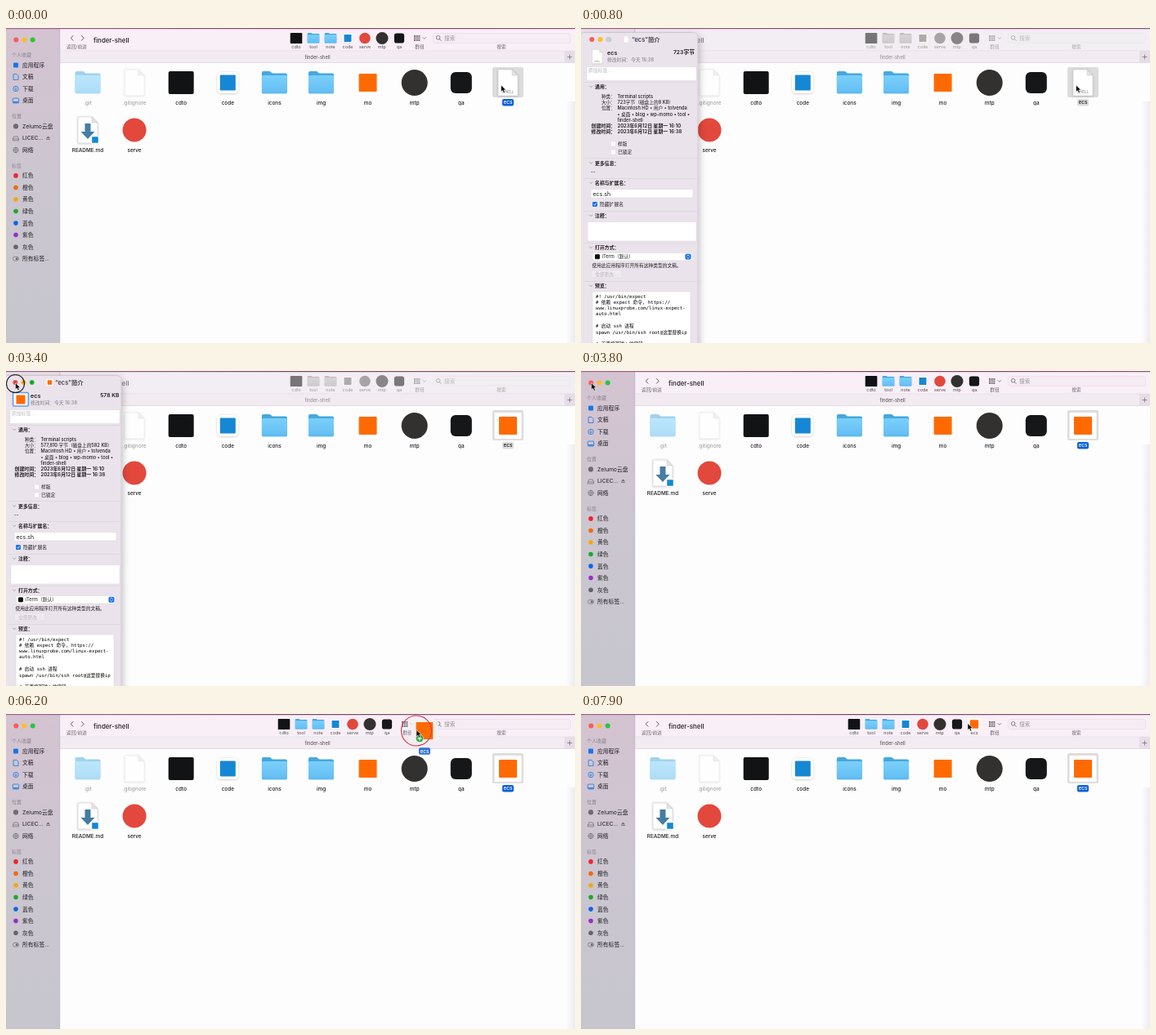
Write an HTML page that moves like this. It is 696 px wide and 386 px high and loops after 8000 ms.

```html
<!DOCTYPE html>
<html lang="zh-CN">
<head>
<meta charset="utf-8">
<title>finder-shell</title>
<style>
html, body { margin: 0; width: 100%; height: 100%; overflow: hidden; background: #fff; }
svg { display: block; }
text { font-family: Inter, "Noto Sans CJK SC", "Noto Sans CJK", sans-serif; white-space: pre; }
text.mono { font-family: "DejaVu Sans Mono", "Noto Sans CJK SC", "Noto Sans CJK", monospace; }
</style>
</head>
<body>
<svg id="stage" width="696" height="386" viewBox="0 0 696 386"></svg>
<script>
const LOOP = 8000;
const BLUE = '#0a60d8', ORANGE = '#ff6a00', INK = '#1f1d20', GREY = '#8d888e';

// --- drawing helpers (text is placed by its vertical centre) ---
const text = (x, y, s, size = 6.4, { fill = INK, anchor = 'start', weight = 400, cls = '' } = {}) =>
  `<text x="${x}" y="${y + size * .36}" font-size="${size}" fill="${fill}" text-anchor="${anchor}" font-weight="${weight}" class="${cls}">${s}</text>`;
const rect = (x, y, w, h, fill, r = 0, more = '') =>
  `<rect x="${x}" y="${y}" width="${w}" height="${h}" fill="${fill}" rx="${r}" ${more}/>`;
const circle = (x, y, r, fill, more = '') => `<circle cx="${x}" cy="${y}" r="${r}" fill="${fill}" ${more}/>`;
const line = (d, stroke = INK, w = .8) =>
  `<path d="${d}" fill="none" stroke="${stroke}" stroke-width="${w}" stroke-linecap="round" stroke-linejoin="round"/>`;
const group = (id, body, more = '') => `<g id="${id}" ${more}>${body}</g>`;
const at = (x, y, s, body, more = '') => `<g transform="translate(${x} ${y}) scale(${s})" ${more}>${body}</g>`;
const mid = { anchor: 'middle' };
const square = (size, fill, r = 0) => rect(-size / 2, -size / 2, size, size, fill, r);
const lights = (x, y) => ['#fc5b57', '#fdbc2e', '#2ac53f'].map((c, i) => circle(x + 10.2 * i, y, 3, c)).join('');

// --- icons, centred on 0,0 in a box about 34 wide ---
const page = `<path d="M-12-16H5l7 7V16h-24z" fill="#fff" stroke="#cbcbce" stroke-width=".6" filter="url(#soft)"/>
  <path d="M5-16v7h7z" fill="#e3e3e5" stroke="#c4c4c8" stroke-width=".5"/>`;
const icon = {
  folder: `<path d="M-15.500-12q0-2 2-2h8l3 2.500h16q2 0 2 2V11h-31z" fill="#45a8de"/>` +
    rect(-15.5, -9, 31, 22.5, 'url(#folder)', 1.6) + rect(-14.5, 11, 29, .7, '#55b3e8'),
  page,
  shell: page + text(0, 11, 'SHELL', 4.6, { ...mid, fill: '#77777a' }),
  terminal: rect(-15.5, -14, 31, 28, '#111315', 2),
  code: rect(-13, -13, 26, 26, '#fff', 5.5, 'filter="url(#soft)"') + square(19, '#1687d4', 1),
  cloud: rect(-16.5, -16, 33, 32, '#fff', 1, 'stroke="#efefef" stroke-width=".5"') + square(22, ORANGE, 1),
  panda: circle(0, 0, 16, '#33312f'),
  qa: square(26, '#151718', 6),
  globe: circle(0, 0, 14.5, '#e2483c'),
  readme: page + `<path d="M-3.500-8h7V2h5L0 11-8.500 2h5z" fill="#467da3"/>` +
    at(9, 12, .4, rect(-13, -13, 26, 26, '#fff', 5.5) + square(19, '#1687d4', 1)),
};

const files = [
  ['.git', 'folder'], ['.gitignore', 'page'], ['cdto', 'terminal'], ['code', 'code'], ['icons', 'folder'],
  ['img', 'folder'], ['mo', 'cloud'], ['mtp', 'panda'], ['qa', 'qa'], null, ['README.md', 'readme'], ['serve', 'globe'],
];
const fileGrid = files.map((f, i) => {
  if (!f) return '';
  const x = 100 + 57.1 * (i % 10), y = i < 10 ? 67 : 125, dim = f[0][0] === '.';
  return at(x, y, 1, icon[f[1]], dim ? 'opacity=".5"' : '') +
    text(x, y + 24.2, f[0], 6.4, { ...mid, fill: dim ? '#a5a5a7' : INK, weight: 500 });
}).join('');

const selectedFile = rect(595, 48, 38, 37, '#dcdcdd', 2.5) +
  group('fileShell', at(614, 67, 1, icon.shell)) + group('fileCloud', at(614, 67, 1, icon.cloud)) +
  rect(607, 87, 14, 8.5, BLUE, 2, 'id="labelBox"') +
  `<text id="label" x="614" y="93.4" font-size="6.4" font-weight="500" text-anchor="middle">ecs</text>`;

// --- sidebar ---
const glyph = {
  app: square(6, '#1878e8', 1),
  doc: line('M-2.500-3.500H1l2 2v5h-5.500z', '#1878e8'),
  down: circle(0, 0, 3.2, 'none', 'stroke="#1878e8" stroke-width=".8"') + line('M0-1.700V1.500M-1.400.2 0 1.600 1.400.2', '#1878e8', .7),
  desk: rect(-3.7, -3, 7.4, 6, 'none', 1, 'stroke="#1878e8" stroke-width=".8"') + rect(-3, 1, 6, 1.4, '#1878e8'),
  drive: line('M-3.500 1-2.200-2h4.400L3.500 1v2h-7zM-3.500 1h7', '#706b72', .7),
  net: circle(0, 0, 3.2, 'none', 'stroke="#706b72" stroke-width=".7"') +
    line('M-3.200 0h6.400M0-3.200v6.400M0-3.200q-3 3.200 0 6.400M0-3.200q3 3.200 0 6.400', '#706b72', .5),
  all: rect(-3.5, -2.4, 7, 4.8, 'none', 2.4, 'stroke="#706b72" stroke-width=".7"') + circle(1.2, 0, 1.5, '#706b72'),
  disc: circle(0, 0, 3.1, '#706b72'),
};
const dot = c => circle(0, 0, 2.8, c);
const sideSections = [
  [33, '个人收藏', [['应用程序', glyph.app], ['文稿', glyph.doc], ['下载', glyph.down], ['桌面', glyph.desk]]],
  [108, '位置', [['Zelumo云盘', glyph.disc], ['LICEC...', glyph.drive], ['网络', glyph.net]]],
  [168.5, '标签', [['红色', dot('#f5222d')], ['橙色', dot('#f56a0a')], ['黄色', dot('#f7a70a')], ['绿色', dot('#1fa82e')],
    ['蓝色', dot('#0a66e8')], ['紫色', dot('#9a2fc4')], ['灰色', dot('#66636a')], ['所有标签...', glyph.all]]],
];
const sidebar = rect(0, 1, 66, 385, 'url(#side)', 0, 'id="sideFill"') + lights(12.3, 14.5) +
  sideSections.map(([y, name, rows]) => text(7, y, name, 6, { fill: '#8b818c', weight: 500 }) +
    rows.map(([label, art], i) => {
      const ry = y + 12.4 + 14.55 * i;
      return at(12, ry, 1, art) + text(20, ry, label, 6.8);
    }).join('')).join('') +
  `<path d="M49 135.300l2.500-2.800 2.500 2.800z" fill="#706b72"/>` + rect(49, 136.2, 5, .8, '#706b72');

// --- toolbar ---
const tools = [['cdto', 'terminal'], ['tool', 'folder'], ['note', 'folder'], ['code', 'code'], ['serve', 'globe'], ['mtp', 'panda'], ['qa', 'qa']];
const tool = ([name, art], x) => at(x, 12.5, .47, icon[art]) + text(x, 22.7, name, 5.4, { ...mid, fill: '#4e494f' });
const gridDots = [0, 1, 2].map(r => [0, 1, 2].map(c => rect(499 + 2.7 * c, 9 + 2.5 * r, 2, 1.8, '#6b666c')).join('')).join('');
const toolbar =
  line('M82 9.400 79.300 12.300 82 15.200M92.500 9.400 95.200 12.300 92.500 15.200', '#555055', .9) +
  text(74, 23, '返回/前进', 5.7, { fill: '#6d676e' }) +
  text(107, 14.8, 'finder-shell', 7.8, { weight: 600, fill: '#3a363b' }) +
  group('tools', tools.map((t, i) => tool(t, 355 + 21 * i)).join('')) +
  group('newTool', tool(['ecs', 'cloud'], 481)) +
  group('arrange', gridDots + line('M510 11.600l1.800 1.800 1.800-1.800', '#6b666c') + text(506, 23, '群组', 5.7, { ...mid, fill: '#6d676e' })) +
  rect(522.5, 6.5, 168, 12, '#f5ecf4', 2.5, 'stroke="#e9dfe8" stroke-width=".7"') +
  circle(528.6, 11.8, 2.3, 'none', 'stroke="#6b666c" stroke-width=".8"') + line('M530.300 13.500l2 2', '#6b666c') +
  text(536, 12.5, '搜索', 6.8, { fill: '#9b949b' }) + text(606, 23, '搜索', 5.7, { ...mid, fill: '#6d676e' });

const finder = rect(0, 0, 696, 386, '#fdfdfe') + rect(685, 90, 11, 296, 'url(#edge)') +
  rect(66, 1, 630, 27, '#f8eff7', 0, 'id="bar"') + rect(66, 28, 630, 14.5, '#f2ebf2') +
  rect(66, 27.6, 630, .6, '#e3d9e2') + rect(66, 42.3, 630, .7, '#dcd5dc') +
  rect(683, 28, 13, 14.5, '#e6dde6') + line('M687 35.500h5M689.500 33v5', '#6b666c', .7) +
  group('tab', text(381, 35.6, 'finder-shell', 5.8, { ...mid, fill: '#4e494f' })) +
  sidebar + rect(65.6, 1, .6, 385, '#b9b3bd') +
  group('toolbar', toolbar) + fileGrid + selectedFile + rect(0, 0, 696, 1.2, 'url(#wall)');

// --- info panel ---
const white = (x, y, w, h, r = 0) => rect(x, y, w, h, '#fff', r, 'stroke="#d9d2da" stroke-width=".5"');
const header = (y, name) => rect(4, y - 6, 138, .5, '#d3ccd4') +
  line(`M10.500 ${y - 1}l1.700 1.700 1.700-1.700`, GREY, .7) + text(17, y, name, 5.9, { weight: 600 });
const field = (y, name, value, size = 5.7, weight = 500) =>
  text(42, y, name, size, { anchor: 'end', weight }) + text(44.5, y, value, size, { weight });
const script = [[328.6, '#! /usr/bin/expect'], [335.7, '# 依赖 expect 命令, https://'], [342.8, 'www.linuxprobe.com/linux-expect-'],
  [350, 'auto.html'], [364.6, '# 启动 ssh 进程'], [372.6, 'spawn /usr/bin/ssh root@这里替换ip'], [387, '# 下面填写输入的密码']];
const bold = { weight: 600 }, boldEnd = { weight: 600, anchor: 'end' };
const panel = rect(-1, 5.5, 144, 420, '#ebe3eb', 5, 'filter="url(#shadow)" stroke="#b5aeb6" stroke-width=".5"') +
  lights(13.3, 14) + circle(33.7, 14, 3, '#d3cbd4', 'id="zoomOff"') +
  group('hover', line('M12 12.700l2.600 2.600M14.600 12.700l-2.600 2.600', '#7a1512', .8) + line('M22 14h3', '#8a5a08') + line('M32.200 14h3M33.700 12.500v3', '#0b6117', .7)) +
  text(62, 14, '“ecs”简介', 7.4, { weight: 600, fill: '#47434a' }) +
  text(32, 30.2, 'ecs', 7.2, bold) + text(32, 39.3, '修改时间：今天 16:38', 5.8, { fill: '#7d787e' }) +
  white(7, 47.5, 134, 17) + text(8.5, 52.3, '添加标签...', 6, { fill: '#bab5bb' }) +
  group('before', at(55.5, 14, .25, icon.page) + at(20, 35, .53, icon.shell) + text(139, 30, '723字节', 6.8, boldEnd) + field(91, '大小：', '723字节（磁盘上的8 KB）')) +
  group('after', at(55.5, 14, .25, icon.cloud) + at(20, 35, .5, icon.cloud) + text(140.5, 30, '578 KB', 6.8, boldEnd) + field(91, '大小：', '577,810 字节（磁盘上的582 KB）')) +
  rect(10.5, 26.5, 19, 16.5, 'none', 1.5, 'id="focus" stroke="#5d9fe6" stroke-width="1.5"') +
  header(72, '通用：') + field(84, '种类：', 'Terminal scripts') +
  field(98.3, '位置：', 'Macintosh HD • 用户 • tolvenda') + field(105.5, '', '• 桌面 • blog • wp-momo • tool •') + field(112.7, '', 'finder-shell') +
  field(120, '创建时间：', '2023年6月12日 星期一 16:10', 5.9, 600) + field(127.3, '修改时间：', '2023年6月12日 星期一 16:38', 5.9, 600) +
  white(36.5, 139, 6, 6, 1) + text(45, 142, '样版', 5.8, { weight: 500 }) + white(36.5, 149, 6, 6, 1) + text(45, 152, '已锁定', 5.8, { weight: 500 }) +
  header(165.5, '更多信息：') + text(12, 176, '--', 6) +
  header(190, '名称与扩展名：') + white(12, 197.5, 125, 10.5) + text(14.5, 203, 'ecs.sh', 7) +
  rect(14, 213, 6, 6, '#1673e6', 1.3) + line('M15.500 216l1.200 1.300 2-2.600', '#fff') + text(23, 216.2, '隐藏扩展名', 5.8, { weight: 500 }) +
  header(230, '注释：') + white(8, 237.5, 133, 23.5) +
  header(269, '打开方式：') + white(14, 275.5, 122, 9.5, 2) + rect(17, 277.2, 6, 6, '#111', 1.2) + text(25.5, 280.4, 'iTerm（默认）', 5.8) +
  rect(127.5, 276.7, 7, 7, '#1673e6', 1.6) + line('M129.600 279.300l1.400-1.300 1.400 1.300M129.600 281.200l1.400 1.300 1.400-1.300', '#fff', .7) +
  text(13.5, 290.5, '使用此应用程序打开所有这种类型的文稿。', 5.75, { weight: 500 }) +
  rect(12, 297, 38, 9, '#efe9f0', 2, 'stroke="#dcd5dd" stroke-width=".5"') + text(31, 301.5, '全部更改...', 5.7, { ...mid, fill: '#b7b1b8' }) +
  header(316, '预览：') + white(14, 323, 120, 100, 1) +
  script.map(([y, s]) => text(18, y, s, 5.7, { cls: 'mono', fill: '#000' })).join('');

// --- things carried by the pointer ---
const carried = group('ghost', rect(-18.5, -15, 37, 30, '#f1f1f2', 0, 'opacity=".85"') + at(0, 0, 1.05, square(22, ORANGE, 1)));
const tag = group('tag', rect(-7, -4.3, 14, 8.6, '#2f72d6', 2) + text(0, 0, 'ecs', 6.4, { ...mid, fill: '#fff', weight: 500 }));
const badge = group('badge', circle(0, 0, 4.6, '#2aa63a', 'stroke="#fff" stroke-width=".5"') + line('M-2.400 0h4.800M0-2.400v4.800', '#fff', 1.1));
const arrow = group('cursor', '<path d="M0 0v8.200l1.900-1.700 1.300 3 1.600-.7-1.300-2.900h2.600z" fill="#000" stroke="#fff" stroke-width=".6"/>');

const gradient = (id, horizontal, ...stops) =>
  `<linearGradient id="${id}" x2="${horizontal ? 1 : 0}" y2="${horizontal ? 0 : 1}">` +
  stops.map((c, i) => `<stop offset="${i / (stops.length - 1)}" stop-color="${c}"/>`).join('') + '</linearGradient>';
const stage = document.getElementById('stage');
stage.innerHTML = `<defs>${gradient('folder', 0, '#7bd0fb', '#62bdf2')}${gradient('side', 0, '#d4c3d1', '#cbc6d0', '#c6c5cd')}
  ${gradient('edge', 1, '#fdfdfe', '#ececef')}${gradient('wall', 1, '#a5628f', '#804168', '#8f507c')}
  <filter id="soft" x="-30%" y="-30%" width="160%" height="160%"><feDropShadow dx="0" dy=".5" stdDeviation=".8" flood-opacity=".25"/></filter>
  <filter id="shadow" x="-20%" y="-10%" width="150%" height="120%"><feDropShadow dx="1" dy="3" stdDeviation="5" flood-opacity=".28"/></filter></defs>` +
  finder + group('panel', panel) + carried + tag + badge + arrow +
  circle(0, 0, 11, 'none', 'id="ring" stroke-width="1.1"');

const el = Object.fromEntries([...stage.querySelectorAll('g[id], rect[id], text[id], circle[id]')].map(n => [n.id, n]));
const show = (node, on) => node.setAttribute('display', on ? 'inline' : 'none');
const place = (node, x, y, sx = 1, sy = sx) => node.setAttribute('transform', `translate(${x} ${y}) scale(${sx} ${sy})`);
const lerp = (a, b, p) => a + (b - a) * p;

// Each track lists [time, ...values]; values are interpolated linearly.
function sample(track, t) {
  const i = track.findIndex(k => k[0] > t);
  if (i === 0) return track[0].slice(1);
  if (i < 0) return track[track.length - 1].slice(1);
  const a = track[i - 1], b = track[i], p = (t - a[0]) / (b[0] - a[0]);
  return a.slice(1).map((v, j) => lerp(v, b[j + 1], p));
}
const pointer = [[0, 605.5, 70], [1000, 605.5, 70], [1400, 506, 200], [1700, 250, 262], [2100, 20, 36], [2400, 20, 36], [2600, 18, 36],
  [2900, 18, 36], [3150, 11.5, 14.5], [3800, 11.5, 14.5], [4200, 489, 78], [4400, 594, 66], [4600, 594, 66],
  [4900, 605.5, 66], [5500, 605.5, 66], [5800, 570, 52], [6100, 506, 22], [6200, 502, 19.5], [6500, 497, 18], [6900, 478, 15], [7500, 473, 11.5]];
const panelOpen = [[450, 0], [700, 1], [3450, 1], [3750, 0]];
const panelDrag = [[2400, 0], [2600, -2]];
const lift = [[5300, 8, 1, 1], [5500, -2.5, 12, 1.65], [5800, 8, 4, 1], [6200, 10, 1, .9], [6900, 3, -2, .5]];
const toolShift = [[6050, 0], [6200, -15], [6500, -15], [6650, -21]];
const arrangeShift = [[6050, 0], [6200, -15], [6500, -15], [6650, 0]];
const ringSize = [[5500, 11], [6200, 18.5]];

function render(t) {
  const between = (a, b) => t >= a && t < b;
  const [x, y] = sample(pointer, t);
  place(el.cursor, x, y);

  const [open] = sample(panelOpen, t), [drag] = sample(panelDrag, t);
  show(el.panel, open > 0);
  place(el.panel, lerp(596, drag, open), lerp(48, 0, open), lerp(.25, 1, open), lerp(.09, 1, open));
  el.panel.setAttribute('opacity', open);

  const inactive = between(500, 3600), pasted = t >= 2800, hovering = t >= 3100;
  el.toolbar.setAttribute('style', inactive ? 'filter:grayscale(1);opacity:.55' : '');
  el.tab.setAttribute('opacity', inactive ? .6 : 1);
  el.bar.setAttribute('fill', inactive ? '#f3eef3' : '#f8eff7');
  el.sideFill.setAttribute('fill', inactive ? '#eee6ed' : 'url(#side)');
  el.labelBox.setAttribute('fill', inactive ? '#dcdcdd' : BLUE);
  el.label.setAttribute('fill', inactive ? INK : '#fff');
  for (const id of ['before', 'fileShell']) show(el[id], !pasted);
  for (const id of ['after', 'fileCloud']) show(el[id], pasted);
  show(el.focus, t >= 2400);
  show(el.zoomOff, !hovering);
  show(el.hover, hovering);

  const [dx, dy, size] = sample(lift, t), carrying = between(5300, 6900);
  show(el.ghost, carrying);
  place(el.ghost, x + dx, y + dy, size);
  show(el.tag, between(5800, 6900));
  place(el.tag, x + 10, y + 26);
  show(el.badge, between(6050, 6900));
  place(el.badge, x + 4, y + 10.5);

  const closing = between(3350, 3550);
  show(el.ring, closing || between(5250, 6900));
  el.ring.setAttribute('stroke', closing ? '#1b1b1d' : '#d43a48');
  el.ring.setAttribute('r', sample(ringSize, t)[0]);
  place(el.ring, x, y + 1);

  place(el.tools, sample(toolShift, t)[0], 0);
  place(el.arrange, sample(arrangeShift, t)[0], 0);
  show(el.newTool, t >= 6900);
}

const start = performance.now();
function tick() {
  render((performance.now() - start) % LOOP);
  requestAnimationFrame(tick);
}
tick();
</script>
</body>
</html>
```
